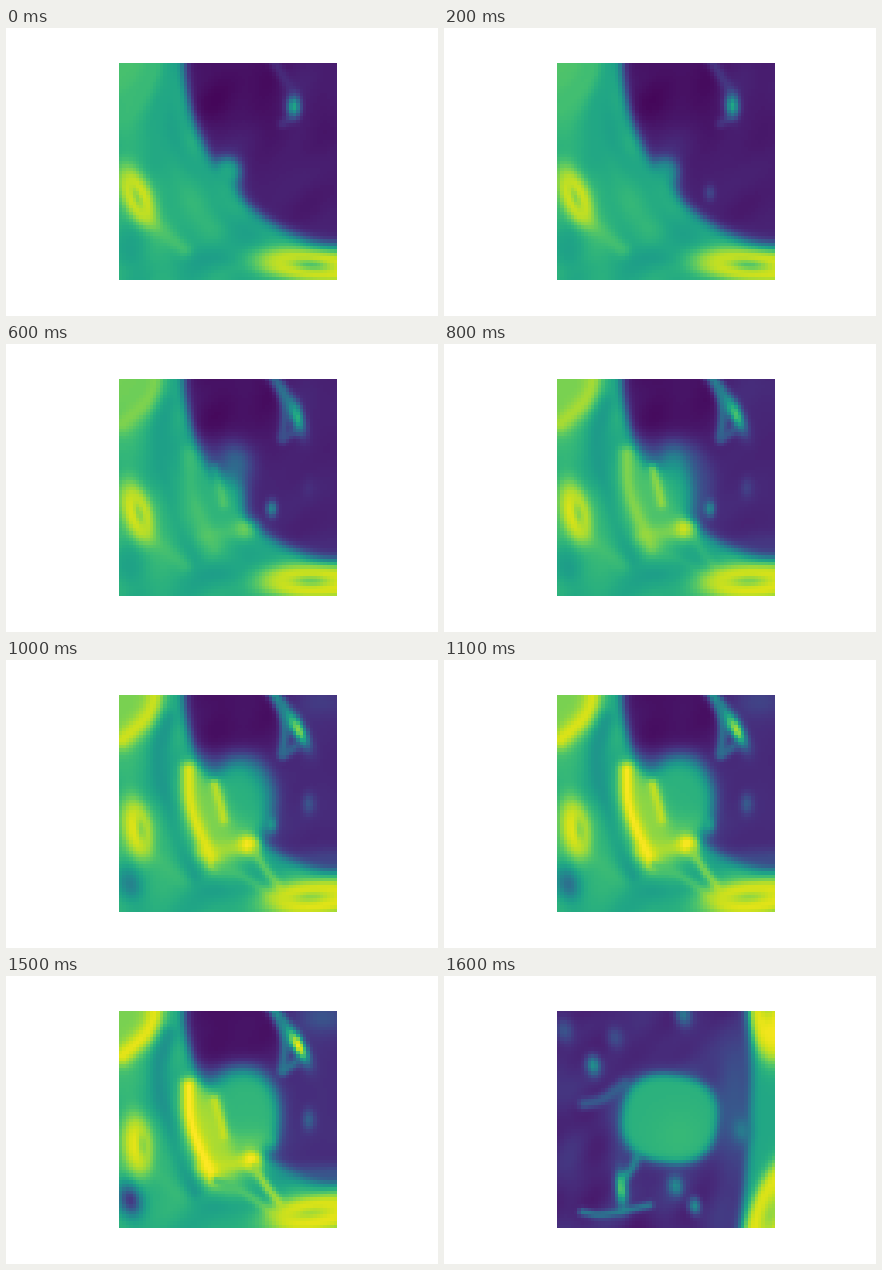
Write a matplotlib script that moves like this. It is 432 by 288 pixels and loops after 1.7 s.

```python
import numpy as np
import matplotlib.pyplot as plt
from matplotlib.animation import FuncAnimation

N, FRAMES = 64, 17
LEFT, TOP, CELL = 112.68, 34.56, 217.44 / 64

axis = (np.arange(N) + 0.5) * CELL
X, Y = np.meshgrid(LEFT + axis, TOP + axis)
WAVES = np.random.default_rng(4).uniform(-1, 1, (14, 4))


def ease(t, a, b, start=0, end=15):
    u = np.clip((t - start) / (end - start), 0, 1)
    return a + (b - a) * u * u * (3 - 2 * u)


def step(d, soft):
    return 1 / (1 + np.exp(np.clip(-d / soft, -50, 50)))


def radius(x, y, rx, ry, tilt=0, power=2):
    """Scaled distance from the centre of a tilted superellipse."""
    c, s = np.cos(np.radians(tilt)), np.sin(np.radians(tilt))
    u = ((X - x) * c + (Y - y) * s) / rx
    w = ((Y - y) * c - (X - x) * s) / ry
    return (abs(u) ** power + abs(w) ** power) ** (1 / power)


def spot(*shape):
    return np.exp(-radius(*shape) ** 2)


def oval(x, y, rx, ry, tilt=0, soft=2.8, power=2):
    return step((1 - radius(x, y, rx, ry, tilt, power)) * min(rx, ry), soft)


def line(pts, width):
    """Soft stroke along a curve through the corner points."""
    pts = np.array(pts, float)
    for _ in range(2):
        a, b = pts[:-1], pts[1:]
        cut = np.stack([0.75 * a + 0.25 * b, 0.25 * a + 0.75 * b], 1)
        pts = np.vstack([pts[:1], cut.reshape(-1, 2), pts[-1:]])
    d2 = np.full((N, N), np.inf)
    for (ax_, ay), (bx, by) in zip(pts[:-1], pts[1:]):
        dx, dy = bx - ax_, by - ay
        u = ((X - ax_) * dx + (Y - ay) * dy) / max(dx * dx + dy * dy, 1e-9)
        u = np.clip(u, 0, 1)
        d2 = np.minimum(d2, (X - ax_ - u * dx) ** 2 + (Y - ay - u * dy) ** 2)
    return np.exp(-d2 / width**2)


def paint(v, mask, value, alpha=1):
    v += (value - v) * mask * alpha


def mottle(t):
    return sum(
        np.sin((X * a + Y * b) * 0.14 + c * 9 + d * t * 0.15)
        for a, b, c, d in WAVES
    ) / 14


def draw_tissue(v, t):
    paint(v, line([(160, 20), (156, 80), (172, 125), (205, 175), (240, 210)], 13),
          0.56, ease(t, 0.8, 0.2))
    paint(v, line([(160, 60), (148, 105), (166, 155), (188, 215)], 10),
          ease(t, 0.6, 0.47), 0.8)
    paint(v, spot(122, 108, 20, 26), 0.69, 0.6)
    paint(v, spot(188, 175, 20, 34, -25), 0.7, 0.7)
    paint(v, line([(140, 188), (158, 205), (178, 222)], 8), 0.71, ease(t, 0.9, 0.3))
    paint(v, spot(215, 230, 28, 10), 0.53, 0.6)
    paint(v, spot(124, 224, 11, 16, -15), ease(t, 0.57, 0.1, 7), 0.9)


def draw_lung(v, t):
    mask = oval(331, 35, 154, ease(t, 182, 170, 4), 0, 2.8, 1.85)
    core = oval(224, 55, 54, 46, 0, 6, 2.5)
    v += (0.04 + ease(t, 0.04, 0.09) * (1 - core) + 0.04 * mottle(t) - v) * mask

    paint(v, oval(221, 143, 11, 11), 0.58, ease(t, 1, 0, 0, 5))
    paint(v, spot(230, 118, 15, 20, -25), 0.42, ease(t, 0, 0.8, 1, 8))
    paint(v, spot(265, 165, 5, 8), 0.5, ease(t, 0, 0.9, 0, 5))
    paint(v, spot(302, 144, 6, 10), 0.36, ease(t, 0, 0.8, 4, 13))
    paint(v, spot(316, 42, 24, 16), 0.26, ease(t, 0, 1, 6))
    paint(v, spot(325, 198, 40, 10), 0.28, ease(t, 0, 0.8, 4))


def draw_vessel(v, t):
    paint(v, line([(265, 30), (275, 46), (287, 66)], 6), ease(t, 0.13, 0.55, 0, 11), 0.9)
    paint(v, line([(275, 45), (279, 68), (276, 92)], 5), 0.4, ease(t, 0, 0.85, 2, 9))
    paint(v, line([(287, 88), (276, 96)], 5), ease(t, 0.16, 0.42), 0.8)
    paint(v, spot(ease(t, 287, 292, 0, 10), ease(t, 79, 71, 0, 10), 6.5,
                  ease(t, 10, 17, 0, 8), ease(t, 0, -27, 0, 10)),
          ease(t, 0.6, 0.98, 4))


def draw_mass(v, t):
    bulge = oval(ease(t, 218, 234, 3, 14), ease(t, 162, 142, 3, 14),
                 ease(t, 12, 37, 3, 14), ease(t, 22, 46, 3, 14), 0, 4, 2.3)
    paint(v, bulge, 0.62)
    grow = ease(t, 0, 1, 3, 11)
    paint(v, oval(207, 158, 20, 50, -18, 4), ease(t, 0.72, 0.88, 4), grow)
    paint(v, line([(198, 192), (225, 188), (245, 184)], 9), ease(t, 0.75, 0.9), grow)
    shade = ease(t, 0.6, 0.66) + 0.15 * step(Y - 162, 6)
    paint(v, oval(242, 138, 26, 38, -5, 4), shade, ease(t, 0, 1, 6, 13))

    glow = ease(t, 0.74, 1, 4, 12)
    paint(v, line([(182, 110), (183, 145), (194, 175), (207, 202)], 8), glow, grow)
    paint(v, line([(208, 125), (213, 142), (217, 160)], 5), 0.93, grow * 0.85)
    paint(v, spot(ease(t, 238, 245, 6), 185, 9, 11, -20), 1, grow)
    late = ease(t, 0, 1, 6, 13)
    paint(v, line([(248, 192), (258, 208), (272, 226)], 5), 0.84, late)
    paint(v, line([(210, 205), (238, 216), (264, 236)], 5), 0.72, late)


def draw_ribs(v, t):
    paint(v, oval(105, 25, 42, 52, 0, 5), ease(t, 0.71, 0.8, 0, 8))
    paint(v, line([(150, 25), (145, 55), (116, 80)], 11), ease(t, 0.68, 0.99, 0, 13), 0.9)

    tilt = ease(t, -24, -6)
    paint(v, oval(131, 169, 14, 30, tilt, 3.5), 0.98)
    paint(v, spot(ease(t, 131, 137), 170, 5, 14, tilt), 0.8, 0.9)

    tilt = ease(t, 5, -7)
    paint(v, oval(309, 238, ease(t, 56, 47), ease(t, 15, 18), tilt, 3, 2.3), 0.98)
    paint(v, spot(304, 237, 21, 6, tilt), ease(t, 0.7, 0.85), 0.9)


def draw_slice(t):
    v = 0.62 + 0.1 * mottle(t)
    for layer in (draw_tissue, draw_lung, draw_mass, draw_ribs, draw_vessel):
        layer(v, t)
    return v


def draw_cross():
    v = 0.12 + 0.12 * mottle(30)
    paint(v, spot(290, 125, 20, 75), 0.3, 0.75)
    paint(v, step(X - 306 + ((Y - 85) / 50) ** 2, 2.6), 0.6)
    for x, y, rx, ry, tilt in [(329, 32, 24, 54, 0), (332, 246, 29, 72, 16)]:
        paint(v, oval(x, y, rx, ry, tilt), 0.99)
        paint(v, spot(x - 6, y - 8, rx / 3, ry / 3, tilt), 0.82, 0.9)

    for x, y, size, value in [(149, 90, 7, 0.5), (120, 55, 9, 0.26), (171, 62, 8, 0.24),
                              (239, 39, 8, 0.4), (231, 210, 7, 0.48),
                              (250, 230, 6, 0.47), (297, 155, 9, 0.42)]:
        paint(v, spot(x, y, size, size * 1.4, -10), value)
    paint(v, line([(140, 128), (158, 125), (180, 108)], 6), 0.33, 0.8)
    paint(v, line([(192, 182), (188, 192), (178, 204)], 5), 0.45)
    paint(v, line([(138, 236), (158, 240), (205, 229)], 4), 0.42, 0.9)
    paint(v, spot(177, 213, 5.5, 17, -4), 0.75)
    paint(v, oval(225, 143, 53, 49, 0, 6, 2.5), 0.35, 0.5)
    paint(v, oval(225, 143, 48, 44, 8, 2.2, 2.5), 0.64 + 0.03 * spot(235, 160, 30, 30))
    return v


def update(i):
    image.set_data(np.clip(draw_cross() if i == FRAMES - 1 else draw_slice(i), 0, 1))
    return [image]


fig, ax = plt.subplots(figsize=(6, 4), dpi=72, facecolor="white")
fig.subplots_adjust(left=0.125, right=0.9, bottom=0.125, top=0.88)
ax.axis("off")
image = ax.imshow(draw_slice(0), cmap="viridis", vmin=0, vmax=1,
                  interpolation="nearest")
anim = FuncAnimation(fig, update, frames=FRAMES, interval=100, repeat=True)
plt.show()
```
